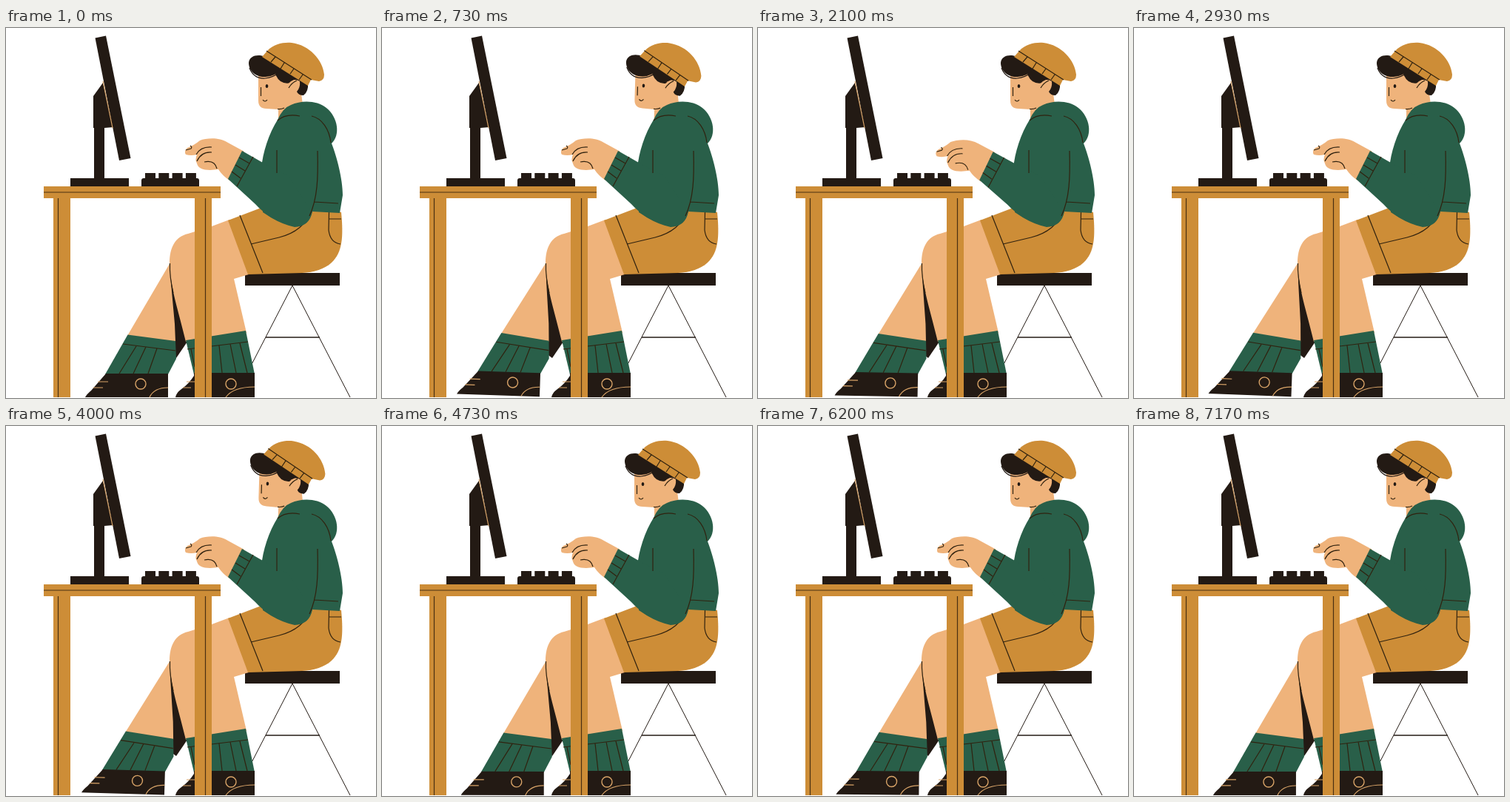
These frames come from a looping animation (500x500 px, 7210 ms). An HTML page with a canvas:

```html
<!DOCTYPE html>
<html lang="en">
<head>
<meta charset="utf-8">
<title>Typing at the desk</title>
<style>
html, body { margin: 0; width: 100%; height: 100%; overflow: hidden; background: #fff; }
canvas { display: block; width: 100vw; height: 100vh; }
</style>
</head>
<body>
<canvas id="stage" width="500" height="500"></canvas>
<script>
const ctx = document.getElementById('stage').getContext('2d');
const LOOP = 7210;
const HALF = LOOP / 2;
const GREEN = '#295f49', SKIN = '#efb37b', OCHRE = '#cd8d37', DARK = '#231a14';
const INK = '#30220f', TAN = '#d9a468';

function fill(d, color) {
  ctx.fillStyle = color;
  ctx.fill(new Path2D(d));
}

function line(d, color = INK, width = 1.2) {
  ctx.strokeStyle = color;
  ctx.lineWidth = width;
  ctx.stroke(new Path2D(d));
}

function rect(x, y, w, h, color) {
  ctx.fillStyle = color;
  ctx.fillRect(x, y, w, h);
}

function ring(x, y, r, color) {
  ctx.strokeStyle = color;
  ctx.lineWidth = 1.4;
  ctx.beginPath();
  ctx.arc(x, y, r, 0, Math.PI * 2);
  ctx.stroke();
}

function turned(x, y, angle, draw) {
  ctx.save();
  ctx.translate(x, y);
  ctx.rotate(angle);
  ctx.translate(-x, -y);
  draw();
  ctx.restore();
}

// Smooth rise and fall, repeated `count` times from `start`.
function pulse(t, start, length, count = 1) {
  const p = (t - start) / length;
  return p < 0 || p > count ? 0 : (1 - Math.cos(2 * Math.PI * p)) / 2;
}

function stool() {
  line('M387 348 L309 499 M387 348 L465 499', DARK, 1);
  line('M351 418 H424', DARK, 1.4);
  rect(323, 331, 128, 17, DARK);
}

function farLeg() {
  fill('M222 317 L164.5 415 L229 424 L228 400 L223 345 Z', SKIN);
  fill('M164.5 414.5 L229 423 L230 447 L219 468 H134 Z', GREEN);
  line('M158 427 L229 436 M176 430 L153 467 M189 431 L172 467 M204 433 L192 467');
  fill('M135 467 H219 V499 H107 Q109 495 115 490 Z', DARK);
  line('M124 478 H138 M118 486 H131 M194 499 Q200 486 219 486', TAN);
  ring(182, 481, 7, TAN);
}

function nearLeg() {
  fill('M302 259 L278 268 L246 278 C229 282 221 296 221 318 ' +
    'C222 352 234 385 243 424 L325 412 L308 339 L328 333 Z', SKIN);
  line('M221.5 318 C221 330 223 345 226 358');
  fill('M243 422 L324 409 L336 468 H254 Z', GREEN);
  line('M245 434 L327 424 M250 434 L255 458 M288 429 L292 466 M303 427 L311 466 M316 426 L326 466');
  fill('M254 466 H336 V499 H229 Q230 493 237 488 Q247 481 254 470 Z', DARK);
  line('M244 478 H256 M239 486 H250 M297 499 Q307 485 336 485', TAN);
  ring(304, 481, 7, TAN);
}

function shorts() {
  fill('M300 260 L342 244 L400 235 L453 249 C456 281 455 303 440 317 C430 326 417 330 400 331 L327 333 Z', OCHRE);
  line('M316 253 L347 331 M331 292 L369 283 C393 277 404 265 413 249');
  line('M436.5 249 L436 273 Q438 290 452 292 M437 258 H453');
}

function table() {
  rect(64, 230, 23, 269, OCHRE);
  rect(255, 230, 23, 269, OCHRE);
  rect(51, 214, 239, 16, OCHRE);
  line('M51 222 H290 M70.5 230 V499 M269.5 230 V499', '#4a3012');
}

function computer() {
  fill('M118 92 L131 74 L145 134 L133 135 V204 H119 V135 H118 Z', DARK);
  fill('M120.5 13.5 L135 10.5 L168.5 176 L153 179 Z', DARK);
  line('M131 72 L144 135', TAN);
  rect(87, 203, 79, 11, DARK);
  fill('M183 214 V206 Q183 203 186 203 H258 Q261 203 261 206 V214 Z', DARK);
  for (let i = 0; i < 4; i++) rect(188 + i * 18.3, 196, 14, 8, DARK);
}

function head() {
  fill('M341 62 V98 Q341 109 352 109 L368 110 V126 L402 112 L399 88 L398 60 Z', SKIN);
  line('M367 109.5 Q372 110 376 108');
  // hair and ear
  fill('M362 52 Q363 66 371 72 Q377 76 385 74 Q391 68 397 72 Q398 80 393 86 ' +
    'Q395 91 402 91 Q409 86 408 74 L385 55 Z', DARK);
  fill('M380 82 Q380 73 389 70 Q397 69 397 76 Q395 84 387 87 Z', SKIN);
  line('M382 81 Q386 74 393 71');
  // cap
  line('M329 54 Q335 69 350 68 Q361 67 369 60', DARK);
  fill('M328 47 C329 37 341 35 350 39 L372 55 Q365 65 351 66 C338 67 328 58 328 47 Z', DARK);
  fill('M346 39 L353 31 C362 21 376 19 386 20 C410 23 428 43 430 63 Q430 71 423 72 L412 70 L408 78 Z', OCHRE);
  line('M352 31 L413 70 M364 39 L358 46 M376 47 L371 55 M389 55 L384 62 M401 63 L396 70');
  // face
  line('M344.5 80 V92 M347 97 Q350 101 353 97');
  ctx.fillStyle = DARK;
  ctx.beginPath();
  ctx.ellipse(352.5, 78.5, 1.8, 2.5, 0, 0, Math.PI * 2);
  ctx.fill();
}

function hoodie() {
  fill('M367 124 Q374 108 385 104 C400 97 421 98 433 108 C449 121 452 145 440 156 ' +
    'C447 174 455 204 455 226 L451 250 L414 248 Q410 268 392 268 Q368 264 347 249 ' +
    'L345 190 C347 168 355 143 367 124 Z', GREEN);
  line('M367 125 C376 117 387 117 397 119 M413 119 C427 122 437 137 439 155');
}

function hand() {
  fill('M322 167 L300 155 C287 147 271 149 262 152 Q255 158 245 162 Q240 166 243 171 ' +
    'Q250 173 258 171 Q255 178 258 183 Q260 192 276 192 L287 191 Q292 199 302 206 Z', SKIN);
  line('M243 165 L250 163 Q252 161 249 159 M257 171 Q263 160 278 161 ' +
    'M258 180 Q264 167 278 168 M268 181 Q282 178 285 190');
}

function cuffSeams() {
  line('M334 174 L312 214 M315 175 L329 183 M310 185 L323 193 M305 194 L317 203');
}

// The sleeve stretches between the moving cuff and the resting elbow.
function arm(tap) {
  const at = (x, y, dx, dy) => `${x + dx * tap} ${y + dy * tap}`;
  const follow = draw => turned(412, 282, -0.145 * tap, draw);
  follow(hand);
  fill(`M${at(319, 166, -15, 14.5)} L${at(347, 182, -3, 10)} L382 200 L413 249 ` +
    `Q409 268 390 269 C367 264 350 252 ${at(337, 238, 2, 8)} L${at(300, 204, -8.5, 16)} Z`, GREEN);
  follow(cuffSeams);
}

function sleeveSeams() {
  line('M366 165 V196 M421 166 C422 202 421 231 410 254 M417 235 L449 237');
}

function paint(t) {
  const half = t % HALF;
  const step = pulse(t % (LOOP / 6), 0, LOOP / 6);
  const nod = pulse(half, 0, 1130);
  const tap = pulse(half, 1150, 500, 2);

  rect(0, 0, 500, 500, '#fff');
  ctx.lineCap = 'butt';
  ctx.lineJoin = 'round';
  stool();
  fill('M222 318 L240 345 L245 424 L230 446 L222 440 Z', DARK);
  turned(238, 320, 0.038 * step, farLeg);
  nearLeg();
  shorts();
  table();
  computer();
  turned(372, 112, 0.036 * nod, head);
  hoodie();
  arm(tap);
  sleeveSeams();
}

function frame() {
  paint(performance.now() % LOOP);
  requestAnimationFrame(frame);
}
frame();
</script>
</body>
</html>
```
